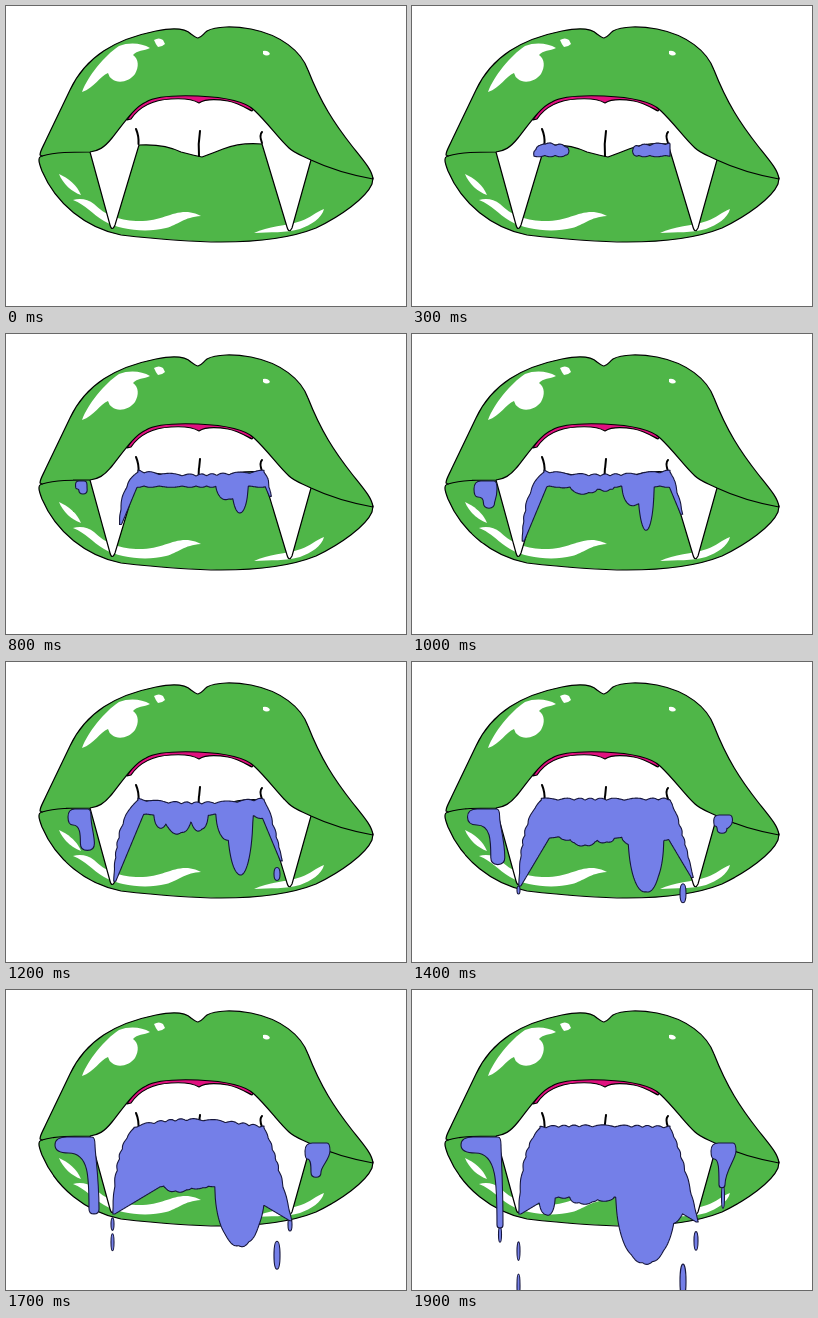
Animation of 400 by 300 pixels, one loop 2000 ms. Source, as an HTML page:

```html
<!DOCTYPE html>
<html lang="en">
<head>
<meta charset="utf-8">
<title>Dripping lips</title>
<style>
html, body { margin: 0; width: 100%; height: 100%; overflow: hidden; background: #fff; }
svg { display: block; width: 100%; height: 100%; }
.lip { fill: #4fb648; }
.line { stroke: #000; stroke-width: 1.2; stroke-linejoin: round; }
.goo { fill: #747fe8; stroke: #16163c; stroke-width: 1.1; stroke-linejoin: round; }
.shine { fill: #fff; }
.gap { fill: none; stroke: #000; stroke-width: 2; stroke-linecap: round; }
</style>
</head>
<body>
<svg viewBox="0 0 400 300">
  <path class="lip line" d="M36 150C31 151 33 157 36 165C50 198 80 222 115 229C150 233 195 236 215 236C255 236 285 232 310 222C335 210 360 192 366 178L367 172L300 120L100 120Z"/>
  <g class="shine">
    <path d="M53 168C62 172 71 179 75 189C66 186 57 178 53 168Z"/>
    <path d="M67 194C74 192 82 193 88 198C99 209 112 214 130 215C155 216 165 205 182 206Q190 207 195 210C178 211 172 219 160 222C140 227 114 224 98 215C86 208 80 199 67 194Z"/>
    <path d="M248 227C262 220 280 220 295 215C304 212 310 206 318 203C316 212 305 219 294 223C280 227 264 226 248 227Z"/>
  </g>
  <path class="line" fill="#fff" d="M84 146L104 219Q106 226 109 219L133 139C150 138 165 141 175 146Q190 150 196 151Q207 147 217 143C230 138 245 137 256 138L281 221Q283 228 286 222L305 154L260 80L130 80Z"/>
  <path class="line" fill="#e0107f" d="M121 114L125 113C133 101 146 94 165 93C180 92 188 94 193 97C199 93 210 93 222 95C232 97 240 102 246 105L250 100L200 80L140 85Z"/>
  <path class="lip line" d="M34 149C34 145 37 141 40 134L64 84C80 50 110 33 150 25C170 21 180 23 185 28C189 31 191 32 192 32C196 31 197 28 201 25C210 20 228 20 245 23C275 29 295 45 302 64C315 97 328 117 346 140C358 155 366 164 367 173C345 169 322 162 305 154C295 149 288 147 283 142C272 132 262 117 248 104C238 94 215 91 192 90C165 89 148 91 140 96C128 101 115 121 106 132C98 142 92 145 84 146C65 146 50 146 36 150Z"/>
  <g class="shine">
    <path d="M76 86C82 70 98 50 113 40C123 36 136 37 144 42C138 45 131 44 127 49C133 53 133 61 129 68C123 76 112 78 106 73Q103 71 102 67C94 70 88 82 76 86Z"/>
    <path d="M148 34Q153 31 157 34L159 38Q156 41 152 41Q150 39 148 34Z"/>
    <path d="M257 45Q262 44 264 48Q261 51 257 48Z"/>
  </g>
  <path class="gap" d="M130 123Q133 130 132.500 138M194 125Q192 138 193 150M256 126Q253 129 256 137"/>
  <path id="drops" class="goo"/>
  <path id="sheet" class="goo"/>
  <path id="sides" class="goo"/>
</svg>
<script>
const LOOP = 2000, STEP = 100, JOIN = 600;
const $ = id => document.getElementById(id);
const mix = (a, b, k) => a + (b - a) * k;
const ramp = (t, a, b) => Math.min(1, Math.max(0, (t - a) / (b - a)));
const ease = (t, a, b) => { const k = ramp(t, a, b); return k * k * (3 - 2 * k); };
const lump = (s, t) => Math.abs(Math.sin(s * 0.22 + 1.2 * Math.sin(s * 0.08 + t / 300)));
const poly = p => "M" + p.map(q => q.map(v => v.toFixed(1))).join("L") + "Z";

// Fingers hanging from the sheet: x, half width, start, speed
const fingers = [
  [222, 12, 300, 0.03], [172, 14, 850, 0.06], [193, 9, 900, 0.06],
  [155, 7, 950, 0.06], [135, 8, 1250, 0.115], [260, 14, 1150, 0.11]
];

function quad(a, b, c, t) {
  return Array.from({ length: 41 }, (_, i) => {
    const k = i / 40;
    const [x, y] = [0, 1].map(j => mix(mix(a[j], b[j], k), mix(b[j], c[j], k), k));
    const side = Math.sign(c[1] - a[1]);
    return [x + side * 1.5 * lump(y, t) * Math.sin(Math.PI * k), y];
  });
}

// Lower edge: the deepest of sheet, both legs and all fingers
function lowerEdge(x, t, tipL, tipR) {
  const base = 142 + 10 * ramp(t, 0, 400) + 55 * ramp(t, 1200, 1900) ** 0.7;
  const slope = 2.4 - 1.8 * ramp(t, 1200, 1700);
  const leg = ([tx, ty]) => ty - slope * Math.max(0, Math.abs(x - tx) - 2);
  const big = [234, 8 + 22 * ramp(t, 1000, 1900), 480, 0.0867];
  const hang = [...fingers, big].map(([fx, w, start, speed]) => {
    const u = (x - fx) / w, len = 150 + speed * (t - start) - base;
    return Math.abs(u) < 1 && t > start && len > 0 ? base + len * Math.sqrt(1 - u * u) : base;
  });
  return Math.max(leg(tipL), leg(tipR), ...hang.map(y => y + 1.3 * lump(x, t)));
}

// One piece of the sheet; an end that is given is free and rounded off
function piece(t, from, to) {
  const yL = 139 + 85 * ease(t, 0, 1400), yR = 138 + 94 * ease(t, 300, 1800);
  const tipL = [118 - (yL - 168) * 0.2, yL], tipR = [258 + (yR - 138) * 0.3, yR];
  const left = [132 - 4 * ramp(t, 1200, 1500), 138], right = [258, 138];
  const x0 = from ?? left[0], x1 = to ?? right[0];
  const rise = 8 * Math.exp(-(((t - 1650) / 180) ** 2));
  const cap = (x, y) => {
    const d = Math.min(from ? x - from : 9, to ? to - x : 9);
    return [x, mix(145, y, Math.sqrt(1 - (1 - ramp(d, 0, 6)) ** 2))];
  };
  const out = [];
  if (!from) out.push(...quad(tipL, [mix(tipL[0], left[0], 0.15), mix(138, yL, 0.22)], left, t));
  for (let x = x0; x <= x1; x++) {
    const arc = Math.sin(Math.PI * ramp(x, left[0], right[0]) ** 0.85);
    out.push(cap(x, 138 + (4 * (1 - ramp(t, 1200, 1500)) - rise) * arc - 2 * lump(x, t)));
  }
  if (!to) out.push(...quad(right, [mix(258, tipR[0], 0.32), mix(138, yR, 0.2)], tipR, t));
  const end = from ?? tipL[0];
  for (let x = to ?? tipR[0]; x >= end; x -= 0.5) out.push(cap(x, lowerEdge(x, t, tipL, tipR)));
  return poly(out);
}

// Dribble at a corner of the mouth: a flat head and one finger
function dribble(t, start, x0, x1, y, cx, speed) {
  if (t < start) return "";
  const grow = ramp(t, start - 200, start + 200);
  const a = mix(cx, x0, grow), b = mix(cx, x1, grow);
  const tip = y + 13 + speed * (t - start), h = Math.min(16, (tip - y) * 0.6);
  const w = (7 - 4 * ease(t, 1500, 1900)) * mix(0.6, 1, ramp(t, start, start + 400));
  const l = cx - w, r = cx + w, m = mix(y + h, tip, 0.4);
  return `M${a} ${y + h / 2}Q${a} ${y} ${mix(a, b, 0.3)} ${y}L${b - 3} ${y}Q${b} ${y} ${b} ${y + h / 2}` +
    `C${b} ${y + h} ${r} ${m} ${r} ${tip - w}Q${r} ${tip} ${cx} ${tip}Q${l} ${tip} ${l} ${tip - w}` +
    `C${l} ${m} ${l} ${y + h} ${mix(a, l, 0.4)} ${y + h}Q${a} ${y + h} ${a} ${y + h / 2}Z`;
}

// Falling drops: x, start, first y, speed, gravity, width, first length
const drops = [
  [106.5, 1400, 228, 0, 2.7e-4, 3, 8], [106.5, 1550, 228, 0, 2.7e-4, 3, 8],
  [271, 1200, 212, 0.09, 3.3e-5, 6, 13], [284, 1650, 234, 0, 2.7e-4, 4, 11],
  [88, 1850, 240, 0.09, 0, 3, 14], [311, 1800, 198, 0.09, 0, 3, 20]
];

function drop(t, [x, start, y0, speed, gravity, w, len]) {
  const d = t - start;
  if (d < 0) return "";
  const y = y0 + speed * d + gravity * d * d, h = (len + 0.03 * d) / 2, r = w * 0.67;
  return `M${x} ${y - h}C${x + r} ${y - h} ${x + r} ${y + h} ${x} ${y + h}C${x - r} ${y + h} ${x - r} ${y - h} ${x} ${y - h}Z`;
}

function sheet(t) {
  if (!t) return "";
  if (t > JOIN) return piece(t);
  const k = t / JOIN;
  return piece(t, null, 133 + 48 * k) + piece(t, 258 - 75 * k, null);
}

function draw(t) {
  $("sheet").setAttribute("d", sheet(t));
  $("sides").setAttribute("d",
    dribble(t, 800, 62 - 13 * ramp(t, 1200, 1600), 85 + 4 * ramp(t, 1200, 1500), 147, mix(77, 88, ramp(t, 1000, 1500)), 0.071) +
    dribble(t, 1300, 299, 324, 153, 310, 0.053));
  $("drops").setAttribute("d", drops.map(d => drop(t, d)).join(""));
}

function tick() {
  draw(Math.floor(performance.now() % LOOP / STEP) * STEP);
  requestAnimationFrame(tick);
}
tick();
</script>
</body>
</html>
```
